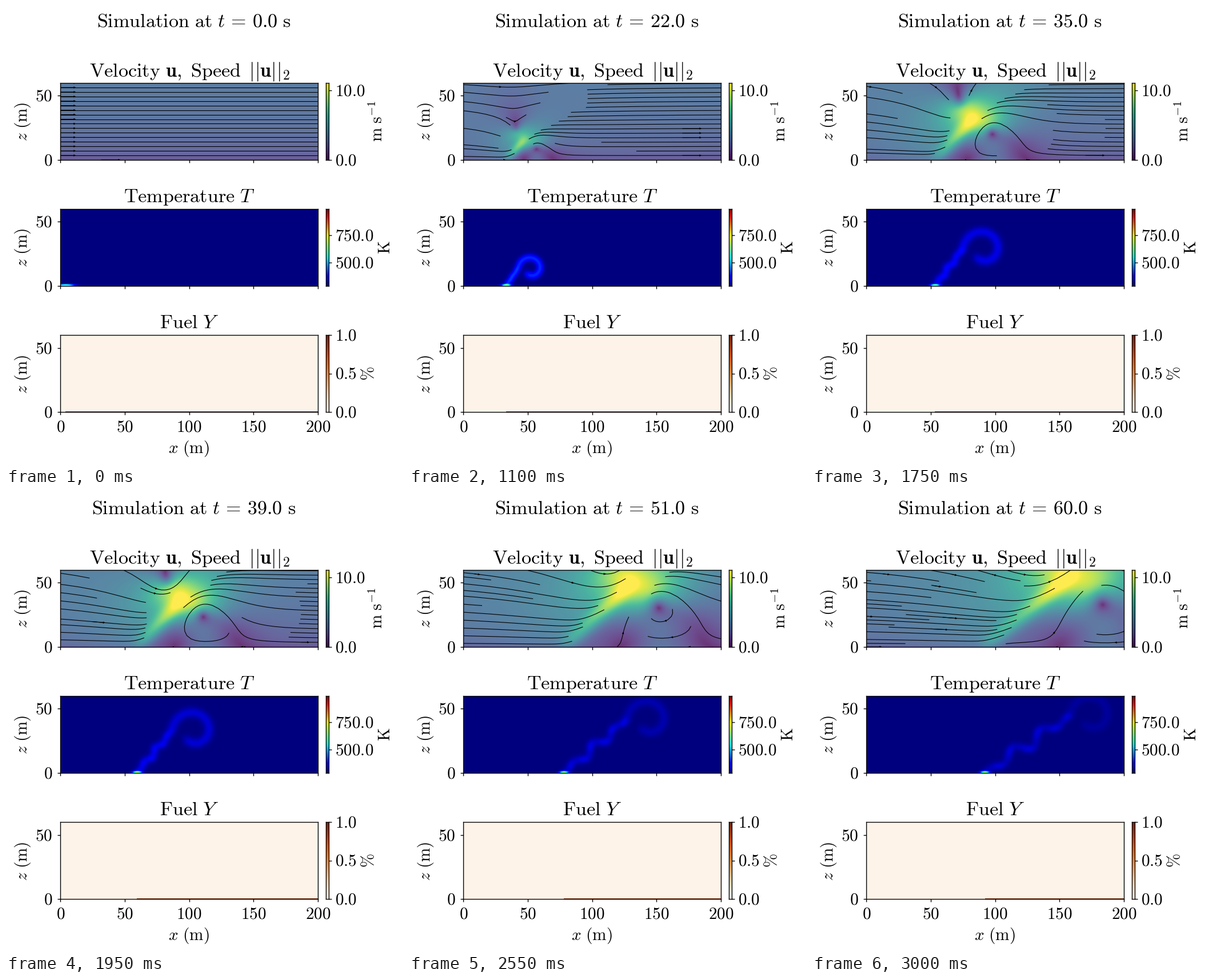
Animation, 695 px wide and 805 px high, one loop 3.05 s. Source, as a matplotlib script:

```python
import numpy as np
import matplotlib.pyplot as plt
from matplotlib.animation import FuncAnimation

W, H, DPI = 695, 805, 100
LEFT, RIGHT, TALL = 95.3, 546, 135
TOPS = (135, 356, 577.3)
FRAMES, INTERVAL = 61, 50
BIG, SMALL = 24.6, 21.1
plt.rcParams.update({"mathtext.fontset": "cm", "axes.linewidth": 1,
                     "xtick.major.width": 1, "ytick.major.width": 1})

# Visible grid, and the wider one on which the flow lines are traced.
x, z = np.linspace(0, 200, 451), np.linspace(0, 60, 136)
x_wide, z_wide = np.linspace(-281, 342, 179), np.linspace(0, 60, 41)
S = np.linspace(0, 1, 90)
MAX_SPEED = 11.07


def front(t):
    """Position of the fire on the ground."""
    return max(4, 1.55 * t - 1)


def eye(t):
    """Centre of the big rolling vortex."""
    return np.array([33 * (t / 14) ** 1.17, 42 * (1 - np.exp(-(t / 38) ** 2.3))])


def glow(gx, gz, curve, amp, r):
    """Soft stroke of radius r along a curve, on the grid gx by gz."""
    cx, cz = curve
    ds = np.hypot(np.gradient(cx), np.gradient(cz))
    weight = amp * ds / (r * np.sqrt(2 * np.pi))
    ex = np.exp(-((gx - cx[:, None]) / r) ** 2 / 2)
    ez = np.exp(-((gz - cz[:, None]) / r) ** 2 / 2)
    return (weight[:, None] * ez).T @ ex


def sigmoid(v):
    return 1 / (1 + np.exp(-np.clip(v, -40, 40)))


def velocity(gx, gz, t):
    X, Z = np.meshgrid(gx, gz)
    xf, c = front(t), eye(t)
    mate = c + np.array([-20, 18]) * t / 30

    # wind profile, slowed down in the wake of the plume
    wake = (sigmoid((X - xf - 0.9 * Z - 4) / 3) * sigmoid((c[0] + 0.7 * t - X) / 8)
            * np.exp(-(Z / (0.75 * c[1] + 1)) ** 4))
    u = 3.27 * ((Z + 0.4) / 60) ** 0.17 * (1 - 0.7 * min(t / 14, 1) * wake)
    w = np.zeros_like(u)

    # counter-rotating pair, mirrored in the ground
    strength, core = min(0.133 * t, 4.8), 0.27 * max(t, 4)
    for (cx, cz), spin in ((c, 1), (mate, -1)):
        for side in (1, -1):
            dx, dz = X - cx, Z - side * cz
            k = spin * side * strength * 2 * core / (core ** 2 + dx ** 2 + dz ** 2)
            u += k * dz
            w -= k * dx

    # jet from the fire up to the gap between the two vortices
    top = (c + mate) / 2
    run, climb = top[0] - xf, top[1]
    size = np.hypot(run, climb)
    amp = min(t / 14, 1) * (2 + 8 * S * (1 - S))
    jet = glow(gx, gz, (xf + run * S, climb * S), amp, np.clip(0.12 * t, 2, 5))
    return u + jet * run / size, w + jet * climb / size * np.tanh(Z / 3)


def heat(t):
    xf, c = front(t), eye(t)
    R = min(0.46 * t, 17)
    cx, cz = c + np.array([-0.35, 0.3]) * R

    # meandering stem with puffs
    run, climb = cx - R - xf, cz
    size = np.hypot(run, climb) + 1e-6
    phase = 6 * np.pi * S - 0.4 * t
    sway = 0.0015 * t ** 2 * np.sin(phase) * np.sin(np.pi * S)
    stem = xf + run * S - sway * climb / size, climb * S + sway * run / size
    power = min(3.6 / max(t, 14), t / 55)
    puffs = power * (1 + 0.35 * np.sin(2 * phase))
    field = glow(x, z, stem, puffs, min(0.8 + 0.045 * t, 2.3))

    # head rolling up clockwise
    turn = np.pi - S * (np.pi + 2.4)
    r = R * (1 - 0.5 * S)
    head = cx + r * np.cos(turn), cz + r * np.sin(turn)
    field += glow(x, z, head, power / (1 + (t / 55) ** 4), min(0.9 + 0.05 * t, 2.7))

    wide = np.interp(t, [0, 6], [4.5, 2.4])
    flame = np.outer(np.exp(-((z - 0.3) / 0.7) ** 2 / 2), np.exp(-((x - xf) / wide) ** 2 / 2))
    return np.clip(field + 0.5 * flame, 0, 1)


fig = plt.figure(figsize=(W / DPI, H / DPI), dpi=DPI, facecolor="white")


def label(px, py, s, size=SMALL, ha="center", va="baseline", rot=0):
    return fig.text(px / W, 1 - py / H, f"${s}$", size=size, ha=ha, va=va, rotation=rot)


def box(x0, x1, top):
    return fig.add_axes([x0 / W, 1 - (top + TALL) / H, (x1 - x0) / W, TALL / H])


def panel(top, name):
    ax = box(LEFT, RIGHT, top)
    ax.set(xlim=(0, 200), ylim=(0, 60), xticks=range(0, 201, 50), yticks=(0, 50))
    ax.tick_params(labelbottom=False, labelleft=False)
    label(321, top - 12, name, BIG)
    for v in (0, 50):
        label(81, top + TALL - v * 2.25 + 9.2, str(v), ha="right")
    label(29.5, top + 68, r"z\ \mathrm{(m)}", va="center", rot=90)
    return ax


def bar(top, cmap, lo, hi, ticks, unit, ux):
    ax = box(560.3, 565, top)
    ax.imshow(np.linspace(0, 1, 256)[:, None], cmap=cmap, extent=(0, 1, lo, hi),
              origin="lower", aspect="auto")
    ax.yaxis.tick_right()
    ax.set(xticks=[], yticks=ticks, ylim=(lo, hi))
    ax.tick_params(labelright=False)
    for v in ticks:
        label(576.5, top + TALL * (hi - v) / (hi - lo) + 9.2, f"{v:.1f}", ha="left")
    label(ux, top + 67, unit, va="center", rot=90)


def picture(ax, cmap, top, **kw):
    return ax.imshow(np.zeros((len(z), len(x))), extent=(0, 200, 0, 60), origin="lower",
                     aspect="auto", cmap=cmap, vmin=0, vmax=top, interpolation="bilinear", **kw)


ax_u = panel(TOPS[0], r"\mathrm{Velocity}\ \mathbf{u},\ \mathrm{Speed}\ \,||\mathbf{u}||_2")
ax_t = panel(TOPS[1], r"\mathrm{Temperature}\ T")
ax_y = panel(TOPS[2], r"\mathrm{Fuel}\ Y")
bar(TOPS[0], "viridis", 0, MAX_SPEED, (0, 10), r"\mathrm{m\ s}^{-1}", 650)
bar(TOPS[1], "jet", 289, 987, (500, 750), r"\mathrm{K}", 664)
bar(TOPS[2], "Oranges", 0, 1, (0, .5, 1), r"\%", 635)
for v in range(0, 201, 50):
    label(LEFT + v * (RIGHT - LEFT) / 200, 746.5, str(v))
label(320, 784, r"x\ \mathrm{(m)}")
title = label(329, 36.7, "", BIG)

img_u = picture(ax_u, "viridis", MAX_SPEED, alpha=0.8)
img_t = picture(ax_t, "jet", 1)
ax_y.set_facecolor("#fef3e8")
fuel, = ax_y.fill([0, 200, 200, 0], [0, 0, .7, .7], color="#7f2704", lw=0)


def update(i):
    t = float(i)
    title.set_text(rf"$\mathrm{{Simulation\ at}}\ t\,=\,{t:.1f}\ \mathrm{{s}}$")
    img_u.set_data(np.hypot(*velocity(x, z, t)))
    img_t.set_data(heat(t))
    for old in [*ax_u.collections, *ax_u.patches]:
        old.remove()
    ax_u.streamplot(x_wide, z_wide, *velocity(x_wide, z_wide, t), density=0.6,
                    color="black", linewidth=0.8, arrowsize=0.4)
    xf = front(t)
    fuel.set_xy([(xf, 0), (200, 0), (200, .7), (xf, .7)])


anim = FuncAnimation(fig, update, frames=FRAMES, interval=INTERVAL, repeat=True,
                     repeat_delay=0, blit=False)
plt.show()
```
